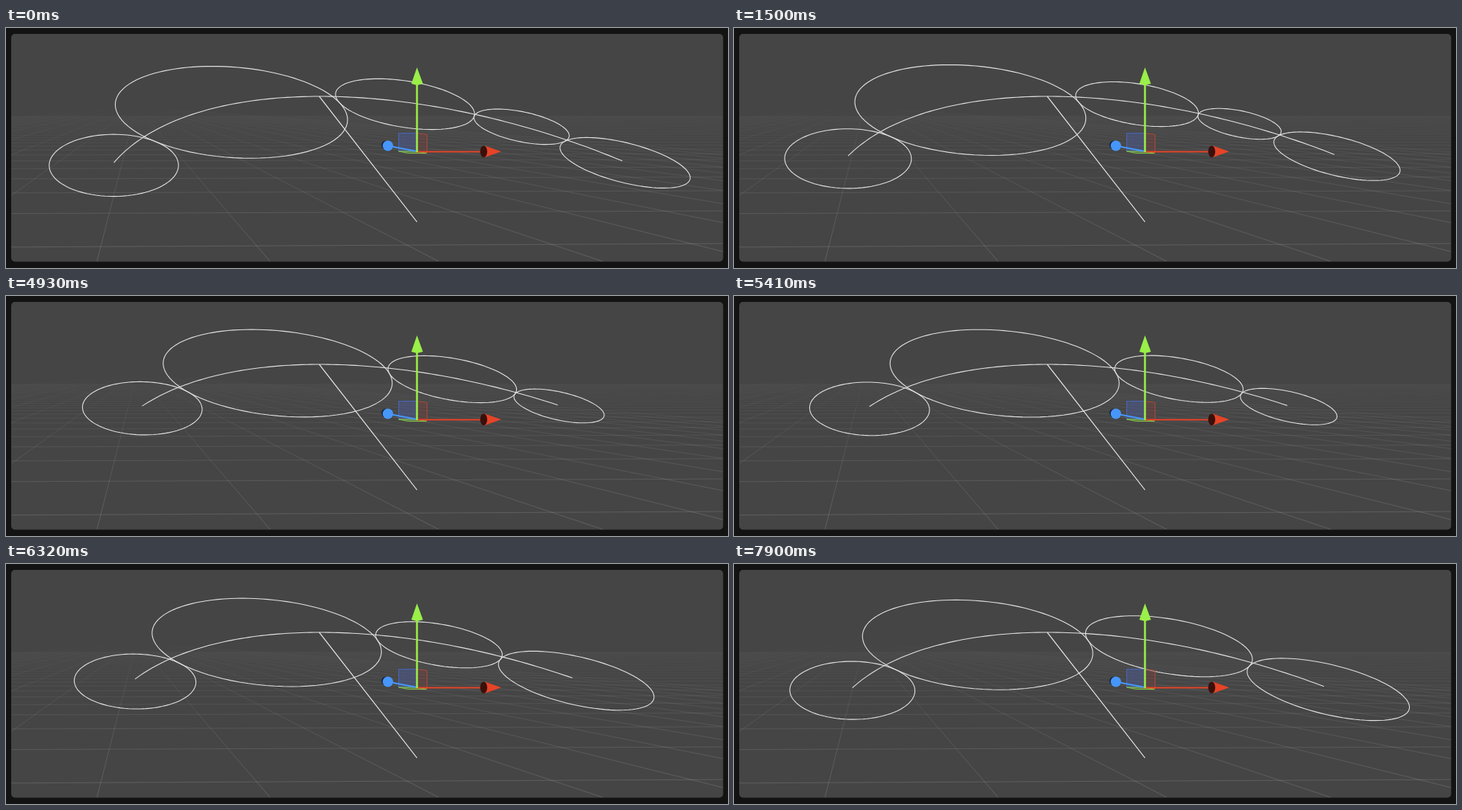
These frames come from a looping animation (968x323 px, 8 s). An HTML page with a canvas:

```html
<!DOCTYPE html>
<html lang="en">
<head>
<meta charset="utf-8">
<title>Discs along an arc</title>
<style>
html, body { margin: 0; width: 100%; height: 100%; overflow: hidden; background: #131313; }
canvas { display: block; }
</style>
</head>
<body>
<canvas width="968" height="323"></canvas>
<script>
const ctx = document.querySelector('canvas').getContext('2d');
const LOOP = 8000;
const TICK = 40;
const REMOVE_LAST = 3430;

// Progress of a slider drag, refreshed once per tick
function drag(t, start, end) {
  const ticks = Math.floor((end - start) / TICK) + 1;
  const done = Math.floor((t - start) / TICK) + 1;
  return Math.max(0, Math.min(1, done / ticks));
}

// Disc radii, in units of the arc radius
function radiiAt(t) {
  const third = 0.283 - 0.034 * drag(t, 30, 330)
    - 0.046 * drag(t, 7070, 7390) + 0.124 * drag(t, 7450, 7900);
  const fourth = 0.168 - 0.019 * drag(t, 1300, 1500)
    + 0.011 * drag(t, 4930, 5410) + 0.137 * drag(t, 5450, 5960)
    - 0.046 * drag(t, 6170, 6320);
  const radii = [0.23, 0.491, third, fourth];
  return t < REMOVE_LAST ? [...radii, 0.192] : radii;
}

// Perspective view of the plane that holds the arc
function project(x, y) {
  const w = 1 + 0.0101 * x + 0.468 * y;
  return [(441 * x + 65.6 * y + 551) / w, (0.4 * x - 125.9 * y + 261) / w];
}

function path(points, { stroke, fill, width = 1 }) {
  ctx.beginPath();
  for (const [x, y] of points) ctx.lineTo(x, y);
  if (fill) {
    ctx.fillStyle = fill;
    ctx.fill();
  }
  if (stroke) {
    ctx.strokeStyle = stroke;
    ctx.lineWidth = width;
    ctx.stroke();
  }
}

function ellipse(x, y, rx, ry, fill) {
  ctx.fillStyle = fill;
  ctx.beginPath();
  ctx.ellipse(x, y, rx, ry, 0, 0, Math.PI * 2);
  ctx.fill();
}

function arcPoints(cx, cy, r, from, to, n = 96) {
  return Array.from({ length: n + 1 }, (_, i) => {
    const a = from + (to - from) * i / n;
    return project(cx + r * Math.sin(a), cy + r * Math.cos(a));
  });
}

function drawGround() {
  ctx.fillStyle = '#131313';
  ctx.fillRect(0, 0, 968, 323);
  ctx.save();
  ctx.beginPath();
  ctx.roundRect(7, 8, 954.5, 306.5, 5);
  ctx.fillStyle = '#454545';
  ctx.fill();
  ctx.clip();
  const fade = ctx.createLinearGradient(0, 106, 0, 314);
  fade.addColorStop(0, 'rgba(255,255,255,0)');
  fade.addColorStop(0.3, 'rgba(255,255,255,0.06)');
  fade.addColorStop(1, 'rgba(255,255,255,0.15)');
  for (let k = -8; k <= 14; k++) {
    path([[175, 105], [122 + 235 * k - 3 * k * k, 314]], { stroke: fade });
  }
  for (let n = 0; n < 40; n++) {
    const depth = 1 / (0.00524 + 0.00162 * n);
    path([[7, 104 + depth], [961, 104 + depth * 0.975]], { stroke: fade });
  }
  ctx.restore();
}

function drawDiscs(radii) {
  const pen = { stroke: '#e2e2e2', width: 1.1 };
  // Neighbouring discs touch, with their centres on the arc
  const angles = [0];
  for (let i = 1; i < radii.length; i++) {
    angles.push(angles[i - 1] + 2 * Math.asin((radii[i - 1] + radii[i]) / 2));
  }
  const half = angles[angles.length - 1] / 2;
  radii.forEach((r, i) => {
    const a = angles[i] - half;
    path(arcPoints(Math.sin(a), Math.cos(a), r, 0, Math.PI * 2), pen);
  });
  path(arcPoints(0, 0, 1, -half, half), pen);
  path([project(0, 0), project(0, 1)], { stroke: '#eee', width: 1.2 });
}

// Parallelogram spanned by two edges from the gizmo's origin
function drawPlane([ax, ay], [bx, by], fill, stroke) {
  const x = 551, y = 166;
  path([[x, y], [x + ax, y + ay], [x + ax + bx, y + ay + by], [x + bx, y + by], [x, y]],
    { fill, stroke });
}

function drawGizmo() {
  const red = '#e64428', green = '#9aef49', blue = '#4796fa';
  drawPlane([-24.5, 0], [0, -24.5], 'rgba(75,95,170,0.4)', '#4a66b8');
  drawPlane([13.5, 2], [0, -24.5], 'rgba(150,60,50,0.25)', '#a8483a');
  drawPlane([-24.5, 0], [13, 2.5], 'rgba(130,200,70,0.3)', '#86c845');

  ellipse(508, 157.5, 4.5, 5.5, '#10203a');
  path([[551, 166], [517, 159.5]], { stroke: blue, width: 2 });
  ellipse(512, 158.5, 7, 7, blue);

  path([[551, 166.5], [638, 166.5]], { stroke: red, width: 2 });
  path([[642, 158.5], [664, 166.3], [642, 174]], { fill: red });
  ellipse(640.5, 166.3, 4.7, 7.8, '#3a100b');

  path([[551, 167], [551, 75]], { stroke: green, width: 2.6 });
  path([[551, 53], [543.5, 75], [551, 77], [559, 75]], { fill: green });
}

function frame(now) {
  drawGround();
  drawDiscs(radiiAt(now % LOOP));
  drawGizmo();
  requestAnimationFrame(frame);
}
requestAnimationFrame(frame);
</script>
</body>
</html>
```
